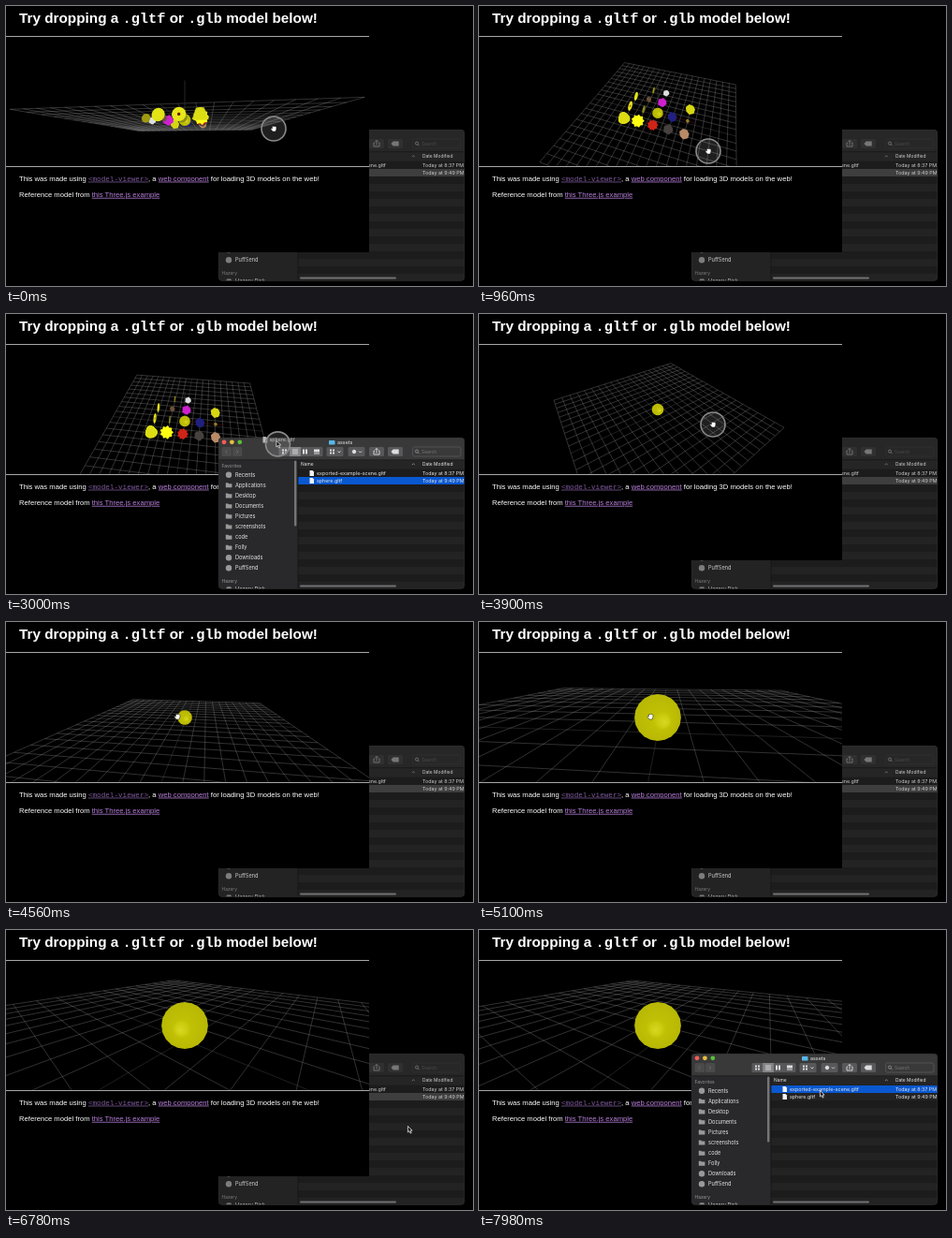
An HTML page with a canvas that plays this animation: 499x299 px, repeating every 8 s.

```html
<!DOCTYPE html>
<html lang="en">
<head>
<meta charset="utf-8">
<title>Model viewer demo</title>
<style>
  html, body { margin: 0; width: 100%; height: 100%; overflow: hidden; background: #000; }
  svg, canvas, #page { position: absolute; left: 0; top: 0; }
  svg { width: 499px; height: 299px; }
  text { white-space: pre; }

  #page { z-index: 1; width: 388px; height: 263px; background: #000; overflow: hidden; }
  #page canvas { top: 33px; width: 388px; height: 138px; }
  #page text { fill: #fff; font: 7.65px "Liberation Sans", Arial, sans-serif; }
  #page .title { font-size: 15.3px; font-weight: bold; }
  #page .mono { font-family: "Liberation Mono", monospace; }
  #page .link { fill: #b77fdb; text-decoration: underline; }
  #page .link.mono { fill: #7d5a9c; }

  #finder {
    z-index: 0;
    --bar: #272727; --side: #232324; --button: #303030; --active: #464646;
    --glyph: #777; --label: #7c7c7c; --text: #cfcfcf; --select: #3e3e3e; --light: #454545; --hint: #4c4c4c;
  }
  #finder.front {
    z-index: 2;
    --bar: #39393a; --side: #29292b; --button: #58585a; --active: #858587;
    --glyph: #ddd; --label: #999; --text: #e8e8e8; --select: #0a58d0; --hint: #77777a;
  }
  #finder text { fill: var(--text); font: 5.35px Inter, sans-serif; }
  #finder .side { font-size: 5.6px; }
  #finder .head { font-size: 4.9px; }
  #finder .label { fill: var(--label); font-size: 4.9px; }
  #finder .hint { fill: var(--hint); font-size: 4.9px; }
  #finder .icon { fill: var(--label); }
  #finder .thin { fill: none; stroke: var(--label); stroke-width: .8; }
  #finder .glyph { fill: none; stroke: var(--glyph); stroke-width: .9; }
  #finder .solid { fill: var(--glyph); }
  #finder .only-front { display: none; }
  #finder.front .only-front { display: inline; }
  #finder.front .only-back { display: none; }

  #pointer { z-index: 3; }
  #ghost text { fill: #fff; font: 5.35px Inter, sans-serif; }
</style>
</head>
<body>
<div id="page">
  <svg viewBox="0 0 499 299">
    <text class="title" x="14" y="17.5">Try dropping a <tspan class="mono">.gltf</tspan> or <tspan class="mono">.glb</tspan> model below!</text>
    <path d="M0 32.5H388M0 171.5H388" stroke="#a8a8a8"/>
    <text x="14" y="186.6">This was made using <tspan class="link mono">&lt;model-viewer&gt;</tspan>, a <tspan class="link">web component</tspan> for loading 3D models on the web!</text>
    <text x="14" y="203.8">Reference model from <tspan class="link">this Three.js example</tspan></text>
  </svg>
  <canvas></canvas>
</div>
<svg id="finder" viewBox="0 0 499 299"></svg>
<svg id="pointer" viewBox="0 0 499 299">
  <g id="ghost" opacity=".65">
    <path d="M-16-8h3.2l1.6 1.6v5h-4.8z" fill="#fff"/>
    <text x="-9" y="-2.6">sphere.gltf</text>
  </g>
  <g id="cursor">
    <circle id="press" r="13" fill="#fff" fill-opacity=".12" stroke="#8a8a8a" stroke-width="1.6"/>
    <path id="hand" d="M-2.6-.6l1 .5v-2.2q.7-1 1.1 0 .5-1.1 1.2 0 .8-.8 1.1.2.9-.5 1.1.4v2.3l-.9 2.4h-3l-2-2.6z"
      fill="#fff" stroke="#111" stroke-width=".5"/>
    <path id="arrow" d="M-1.6-3.6v6.6l1.5-1.4 1.1 2.5 1.2-.5-1.1-2.5h2z" fill="#111" stroke="#fff" stroke-width=".7"/>
  </g>
</svg>
<script>
const LOOP = 8000, STEP = 60;
const $ = id => document.getElementById(id);
const rad = deg => deg * Math.PI / 180;
const within = (spans, t) => spans.some(([a, b]) => t >= a && t < b);

// Timelines: time, then values
const POINTER = [
  [0, 286, 131], [960, 245, 155], [1140, 245, 155], [1440, 431, 213], [1560, 431, 213],
  [1740, 395, 192], [2040, 341, 183], [2600, 341, 183], [3220, 270, 121], [3480, 270, 121],
  [3900, 250, 118], [4200, 232, 109], [4440, 183, 101], [5280, 183, 101], [5880, 166, 103],
  [6060, 166, 103], [6600, 431, 213], [7260, 431, 213], [7740, 366, 175], [8000, 366, 175]
];
const CAMERA = [ // yaw before the steady spin, pitch, distance
  [0, -82, -14.7, 1.9], [960, 23.9, 47, 1.9], [3480, 23.9, 47, 1.87],
  [3900, 77, 41, 1.87], [4200, 123.2, 18, 1.87], [4320, 123.2, 18, 1.87], [5040, 123.2, 18, .475],
  [5280, 123.2, 18, .475], [5880, 168, 23.6, .475], [8000, 168, 23.6, .475]
];
const SPIN = 5.625; // degrees per second
const PRESSED = [[0, 1140], [1480, 1560], [2580, 3240], [3480, 4200], [5280, 5940], [7140, 7240], [7800, 7920]];
const FRONT = [[1520, 3480], [7200, 8000]];
const DRAG = [2640, 3240], SWAP = 3300, SELECT = 7800;

function track(rows, t) {
  const i = Math.max(1, rows.findIndex(r => r[0] > t));
  const a = rows[i - 1], b = rows[i];
  const k = (t - a[0]) / (b[0] - a[0]), e = k * k * (3 - 2 * k);
  return a.slice(1).map((v, j) => v + (b[j + 1] - v) * e);
}

// File window
function buildFinder() {
  const rect = (x, y, w, h, fill, r = 0, extra = '') =>
    `<rect x="${x}" y="${y}" width="${w}" height="${h}" rx="${r}" fill="${fill}" ${extra}/>`;
  const text = (x, y, str, cls = '') => `<text x="${x}" y="${y}" class="${cls}">${str}</text>`;
  const path = (d, cls = 'glyph') => `<path d="${d}" class="${cls}"/>`;
  const button = (x, w, d, cls) => rect(x, 142, w, 10, 'var(--button)', 1.5) + path(d, cls);
  const file = (y, name, time) =>
    `<path d="M324.5 ${y - 3}h3l1.5 1.5v4.6h-4.5z" fill="#f2f2f2"/>` +
    text(332, y + 2, name) + text(445, y + 2, time);

  let s = `<clipPath id="frame"><rect x="227" y="132" width="263" height="161.5" rx="4"/></clipPath><g clip-path="url(#frame)">`;
  s += rect(227, 132, 263, 162, '#1c1c1d') + rect(227, 132, 263, 24, 'var(--bar)');
  s += rect(227, 156, 85, 138, 'var(--side)');
  ['#fc5b57', '#e5bf3c', '#57c038'].forEach((c, i) => {
    const dot = (fill, cls) => `<circle cx="${233 + i * 8.4}" cy="136.8" r="2.4" fill="${fill}" class="${cls}"/>`;
    s += dot(c, 'only-front') + dot('var(--light)', 'only-back');
  });
  s += rect(345, 135, 6.5, 4.6, '#58b7e8', .7) + text(354, 139.4, 'assets');

  s += '<g opacity=".55">' + button(230.5, 10.5, 'M236.5 145l-2 2 2 2', 'thin') + button(241.8, 10.5, 'M246 145l2 2-2 2', 'thin') + '</g>';
  s += button(291.5, 47, 'M295 144.5h2v2h-2zM298 144.5h2v2h-2zM295 147.5h2v2h-2zM298 147.5h2v2h-2zM317 144.5h2v5h-2zM320 144.5h2v5h-2zM329 144.5h6v3h-6zM329 148.5h6v1h-6z', 'solid');
  s += rect(303.2, 142, 11.7, 10, 'var(--active)') + path('M306 145h6M306 147h6M306 149h6');
  s += button(342.5, 18, 'M346 144.5h2v2h-2zM349 144.5h2v2h-2zM346 147.5h2v2h-2zM349 147.5h2v2h-2z', 'solid');
  s += path('M354.5 146.5l1.5 1.5 1.5-1.5M377 146.5l1.5 1.5 1.5-1.5');
  s += button(365.5, 18, 'M372 144.5l2.5 2.5-2.5 2.5-2.5-2.5z', 'solid') + '<circle cx="372" cy="147" r="2" class="solid"/>';
  s += path('M377 146.5l1.5 1.5 1.5-1.5');
  s += button(388, 16, 'M394 146h-1v4h6v-4h-1M396 148.5v-5l-1.5 1.5M396 143.5l1.5 1.5');
  s += button(408, 16, 'M411.5 147l2.2-2.4h6v4.8h-6z', 'solid');
  s += rect(434.5, 142, 51.5, 10, 'var(--bar)', 2, 'stroke="var(--button)" stroke-width=".8"');
  s += '<circle cx="439" cy="146.6" r="1.6" class="thin"/>' + path('M440.2 147.8l1.5 1.5', 'thin') + text(444, 149, 'Search', 'hint');

  s += text(230.5, 163.8, 'Favorites', 'label');
  ['Recents', 'Applications', 'Desktop', 'Documents', 'Pictures', 'screenshots', 'code', 'Folly', 'Downloads', 'PuffSend']
    .forEach((name, i) => {
      const y = 171.7 + i * 11.06;
      s += text(245, y + 2.1, name, 'side');
      s += [0, 8, 9].includes(i)
        ? `<circle cx="238" cy="${y}" r="3.2" class="icon"/>`
        : path(`M234.8 ${y - 2.4}h2.4l.8.8h3.4v4.2h-6.6z`, 'icon');
    });
  s += text(230.5, 286.8, 'Hazery', 'label') + text(245, 296.3, 'Hazery Disk', 'side');
  s += path('M235 293.500q1-3 3-2 3-1 3 2z', 'icon');
  s += rect(308, 156.5, 2.4, 70, '#757577', 1.2, 'class="only-front"');

  s += rect(312, 156, 178, 9.6, '#252526') + text(315, 162, 'Name', 'head') + text(445, 162, 'Date Modified', 'head');
  s += path('M433.8 161l1.5-1.2 1.5 1.2', 'thin');
  for (let i = 1; i < 16; i += 2) s += rect(312, 166 + i * 8, 178, 8, '#232324');
  s += rect(312, 174, 178, 8, 'var(--select)', 0, 'id="selection"');
  s += file(170, 'exported-example-scene.gltf', 'Today at 8:37 PM') + file(178, 'sphere.gltf', 'Today at 9:49 PM');
  s += rect(314, 289.4, 103, 2.2, '#737373', 1.1);
  s += '<path d="M227 155.7H490M312 156V293" stroke="#111" stroke-width=".6"/></g>';
  s += rect(227.3, 132.3, 262.4, 161, 'none', 4, 'stroke="#2e2e2e" stroke-width=".6"');
  $('finder').innerHTML = s;
}

// 3D view
const VIEW = { x: 191, y: 102, top: 33, w: 388, h: 138, focal: 166.5 };
const canvas = document.querySelector('canvas');
const dpr = window.devicePixelRatio || 1;
canvas.width = VIEW.w * dpr;
canvas.height = VIEW.h * dpr;
const ctx = canvas.getContext('2d');

// kind, x, z, radius, colour
const MODELS = [
  ['blob', 0, -.4, .05, '#dedede'], ['disc', -.2, -.4, .05, '#a09a10'],
  ['disc', -.4, -.2, .065, '#e3e316'], ['gem', -.2, -.2, .04, '#6d5037'],
  ['blob', 0, -.2, .068, '#cf20cf'], ['gem', .4, -.2, .072, '#d6d613'],
  ['ring', -.4, 0, .068, '#e6e61b'], ['disc', -.2, 0, .055, '#8d8c1a'],
  ['ball', 0, 0, .071], ['gem', .2, 0, .068, '#20207e'], ['gem', .4, 0, .025, '#8f7d28'],
  ['cone', -.4, .2, .078, '#dddd14'], ['star', -.2, .2, .085, '#ffff12'],
  ['star', 0, .2, .07, '#cf2418'], ['blob', .2, .2, .065, '#46413f'], ['gem', .4, .2, .066, '#b98b66']
];

function makeCamera(yaw, pitch, dist, targetY) {
  const cy = Math.cos(rad(yaw)), sy = Math.sin(rad(yaw));
  const cp = Math.cos(rad(pitch)), sp = Math.sin(rad(pitch));
  const toEye = (x, y, z) => {
    const v = x * sy + z * cy, h = y - targetY;
    return [x * cy - z * sy, v * sp - h * cp, dist - v * cp - h * sp];
  };
  const toScreen = ([a, b, d]) => [VIEW.x + VIEW.focal * a / d, VIEW.y + VIEW.focal * b / d];
  return { toEye, toScreen, yaw, project: (...p) => toScreen(toEye(...p)) };
}

function line(cam, p, q, color, width = .65) {
  const NEAR = .03;
  let a = cam.toEye(...p), b = cam.toEye(...q);
  if (a[2] < b[2]) [a, b] = [b, a];
  if (a[2] < NEAR) return;
  if (b[2] < NEAR) {
    const k = (a[2] - NEAR) / (a[2] - b[2]);
    b = a.map((v, i) => v + (b[i] - v) * k);
  }
  ctx.strokeStyle = color;
  ctx.lineWidth = width;
  ctx.beginPath();
  ctx.moveTo(...cam.toScreen(a));
  ctx.lineTo(...cam.toScreen(b));
  ctx.stroke();
}

function polygon(n, point, fill) {
  ctx.beginPath();
  for (let i = 0; i < n; i++) ctx.lineTo(...point(i * 2 * Math.PI / n, i));
  ctx.closePath();
  ctx.fillStyle = fill;
  ctx.fill();
}

function ball(cam, x, y, r) {
  const shift = Math.max(-.4, Math.min(.4, (8 - (cam.yaw - 94.5) * .37) / 24));
  const g = ctx.createRadialGradient(x + shift * r, y + .23 * r, 0, x, y, r);
  g.addColorStop(0, '#d8d824');
  g.addColorStop(.25, '#cccc10');
  g.addColorStop(.4, '#c0c005');
  g.addColorStop(1, '#b8b805');
  polygon(20, a => [x + r * Math.cos(a), y + r * Math.sin(a)], g);
}

function drawModel(cam, [kind, x, z, size, color]) {
  const eye = cam.toEye(x, 0, z), [px, py] = cam.toScreen(eye);
  const r = VIEW.focal * size / eye[2];
  const around = (n, wobble) => polygon(n, (a, i) => {
    const k = r * wobble(i);
    return [px + k * Math.cos(a), py + k * Math.sin(a)];
  }, color);
  const upright = (s, fill) =>
    polygon(18, a => cam.project(x, s * Math.cos(a), z + s * Math.sin(a)), fill);

  if (kind === 'ball') ball(cam, px, py, r);
  else if (kind === 'blob') around(14, i => .9 + .1 * Math.sin(i * 2.4));
  else if (kind === 'gem') around(7, i => i % 3 ? 1 : .87);
  else if (kind === 'star') around(18, i => i % 2 ? .78 : 1);
  else if (kind === 'cone') {
    for (let k = 0; k <= 10; k++) {
      const s = size * (1 - k * .045);
      polygon(18, a => cam.project(x + s * Math.cos(a), -.05 + k * .01, z + s * Math.sin(a)), color);
    }
  } else {
    upright(size, color);
    if (kind === 'ring') upright(size * .22, '#6b1b10');
  }
}

function drawView(t) {
  const full = t < SWAP;
  const [yaw, pitch, dist] = track(CAMERA, t);
  const cam = makeCamera(yaw - SPIN * t / 1000, pitch, dist, full ? .225 : 0);
  ctx.setTransform(dpr, 0, 0, dpr, 0, -VIEW.top * dpr);
  ctx.fillStyle = '#000';
  ctx.fillRect(0, VIEW.top, VIEW.w, VIEW.h);

  for (let i = -10; i <= 10; i++) {
    const k = i / 10, color = i ? 'rgba(140,140,140,.55)' : 'rgba(90,90,90,.55)';
    line(cam, [k, -.05, -1], [k, -.05, 1], color);
    line(cam, [-1, -.05, k], [1, -.05, k], color);
  }
  if (full) {
    line(cam, [0, 0, 0], [0, .5, 0], '#303030', .8);
    line(cam, [0, 0, 0], [.5, 0, 0], '#571010', .6);
  }
  MODELS.filter(m => full || m[0] === 'ball')
    .map(m => ({ m, depth: cam.toEye(m[1], 0, m[2])[2] }))
    .sort((a, b) => b.depth - a.depth)
    .forEach(({ m }) => drawModel(cam, m));
}

const show = (id, on) => $(id).setAttribute('display', on ? 'inline' : 'none');

function render(t) {
  const [x, y] = track(POINTER, t);
  const front = within(FRONT, t), dragging = within([DRAG], t);
  const overView = x < VIEW.w && y > VIEW.top && y < VIEW.top + VIEW.h && !(front && x > 227 && y > 132);
  const hand = overView && !dragging;
  const place = `translate(${x} ${y})`;

  drawView(t);
  $('finder').classList.toggle('front', front);
  $('selection').setAttribute('y', t >= SELECT ? 166 : 174);
  $('cursor').setAttribute('transform', place);
  $('ghost').setAttribute('transform', place);
  show('ghost', dragging);
  show('press', within(PRESSED, t));
  show('hand', hand);
  show('arrow', !hand);
}

buildFinder();
const start = performance.now();
function tick() {
  const t = (performance.now() - start) % LOOP;
  render(Math.floor(t / STEP) * STEP);
  requestAnimationFrame(tick);
}
tick();
</script>
</body>
</html>
```
